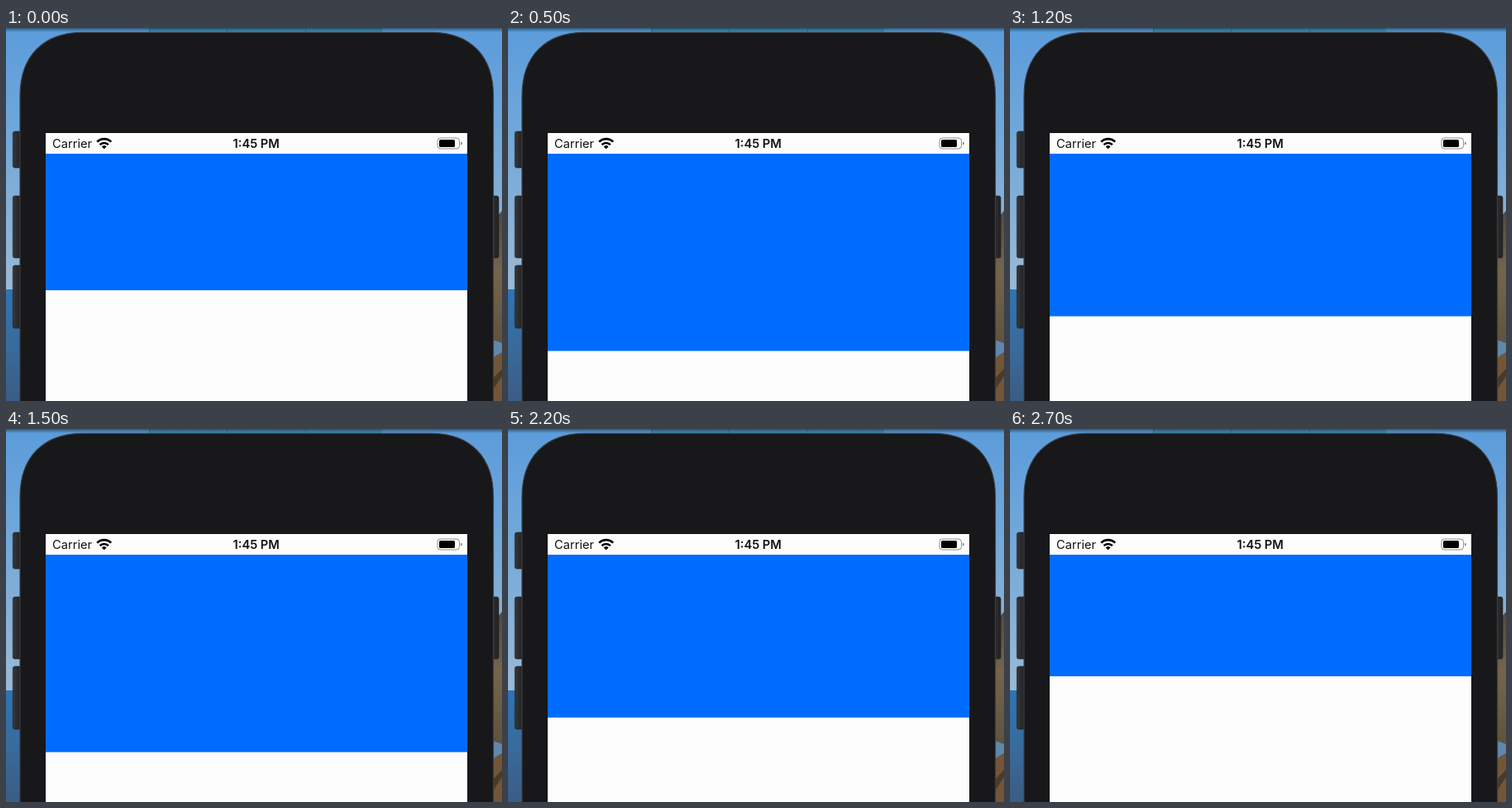
These frames come from a looping animation (600 by 451 pixels, 2.8 s). An HTML page:

```html
<!DOCTYPE html>
<html lang="en">
<head>
<meta charset="utf-8">
<title>Growing panel</title>
<style>
  html, body { margin: 0; width: 100%; height: 100%; overflow: hidden; background: #18171a; }
  svg { display: block; width: 600px; height: 451px; }
  text { font: 14.7px Inter, "Liberation Sans", sans-serif; fill: #111; }
  .time { font-weight: 600; text-anchor: middle; }
  .key { fill: url(#key); stroke: #1b1b1d; stroke-width: .6; }
  .wave { fill: none; stroke: #000; stroke-width: 2.6; }
</style>
</head>
<body>
<svg viewBox="0 0 600 451">
  <defs>
    <linearGradient id="sky" x2="0" y2="1">
      <stop offset="0" stop-color="#5b9cdb"/>
      <stop offset=".35" stop-color="#6ea6da"/>
      <stop offset=".7" stop-color="#86b0d6"/>
      <stop offset="1" stop-color="#9bbad5"/>
    </linearGradient>
    <linearGradient id="sea" x2="0" y2="1">
      <stop offset="0" stop-color="#2f74b4"/>
      <stop offset=".5" stop-color="#396b9c"/>
      <stop offset="1" stop-color="#3b5c84"/>
    </linearGradient>
    <linearGradient id="rock" x2="0" y2="1">
      <stop offset="0" stop-color="#4f493f"/>
      <stop offset=".45" stop-color="#75654c"/>
      <stop offset="1" stop-color="#5f533f"/>
    </linearGradient>
    <linearGradient id="shade" x2="0" y2="1">
      <stop offset="0" stop-color="#10303f" stop-opacity=".6"/>
      <stop offset="1" stop-color="#10303f" stop-opacity="0"/>
    </linearGradient>
    <linearGradient id="key">
      <stop offset="0" stop-color="#38383a"/>
      <stop offset=".4" stop-color="#2c2c2e"/>
      <stop offset="1" stop-color="#222224"/>
    </linearGradient>
  </defs>

  <!-- Desktop -->
  <rect width="600" height="317" fill="url(#sky)"/>
  <rect y="316" width="600" height="135" fill="url(#sea)"/>
  <path d="M173 0H455V6H173Z" fill="#3f8fb4"/>
  <path d="M267.5 0V6M362.5 0V6M173.5 0V6" stroke="#2f7396"/>
  <rect width="600" height="5" fill="url(#shade)"/>
  <path d="M586 235L593 229L600 221V381L594 379L586 376Z" fill="url(#rock)"/>
  <path d="M586 376L600 381V393L586 404Z" fill="#5f88ac"/>
  <path d="M586 402L593 396L600 392V451H586Z" fill="#735538"/>
  <path d="M589 424L600 412V421L590 436Z" fill="#4a3a2a"/>

  <!-- Phone -->
  <g class="keys">
    <rect class="key" x="8.3" y="125" width="11" height="44" rx="2.5"/>
    <rect class="key" x="8.3" y="203" width="11" height="75" rx="2.5"/>
    <rect class="key" x="8.3" y="287" width="11" height="76" rx="2.5"/>
    <rect class="key" x="586" y="203" width="10" height="75" rx="2.5"/>
  </g>
  <path d="M17 460V82C17 34 45 5.300 93 5.300H514C562 5.300 589.500 34 589.500 82V460Z"
        fill="#18171a" stroke="#3b3d41" stroke-width="1.200"/>

  <!-- Screen -->
  <rect x="48" y="127" width="510" height="324" fill="#fefdfe"/>
  <rect id="panel" x="48" y="152" width="510" height="165" fill="#006cff"/>
  <text x="56" y="145.300">Carrier</text>
  <text class="time" x="302.700" y="145.300">1:45 PM</text>
  <path class="wave" d="M110.200 137.700A12 12 0 0 1 127.200 137.700M113.500 141.200A7.300 7.300 0 0 1 123.900 141.200"/>
  <path d="M118.700 146.300L115.800 143.400A4.100 4.100 0 0 1 121.600 143.400Z"/>
  <rect x="522" y="133" width="26.500" height="13" rx="3.500" fill="none" stroke="#8d8d8f"/>
  <rect x="524" y="135" width="19" height="9" rx="1.600"/>
  <path d="M550 137.400Q552 138 552 139.500T550 141.600Z" fill="#8d8d8f"/>
</svg>
<script>
  const LOOP = 2800, TICK = 100;

  const grow = document.getElementById('panel').animate(
    [{ height: '147px' }, { height: '247px' }],
    { duration: 1000, easing: 'ease-in-out', iterations: Infinity }
  );
  grow.pause();

  // The panel advances in ticks and starts each loop part-way through a cycle.
  const start = performance.now();
  function draw(now) {
    const t = Math.max(0, now - start) % LOOP;
    grow.currentTime = 295 + Math.floor(t / TICK) * TICK * 1.002;
    requestAnimationFrame(draw);
  }
  draw(start);
</script>
</body>
</html>
```
